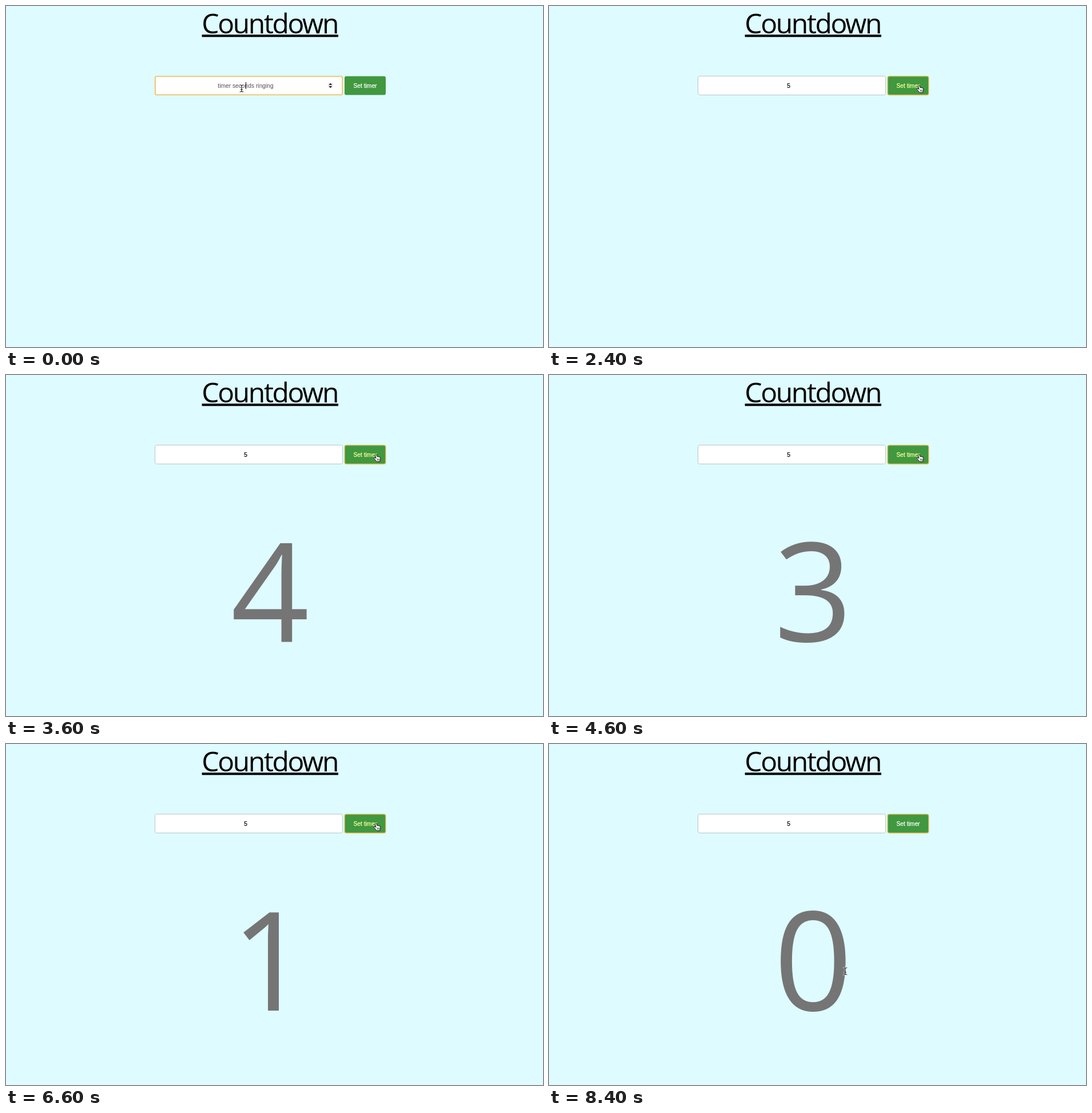
Recreate the animation shown at these times as an HTML page with a canvas. Size 939 px wide and 596 px high, loop 8.62 s.

```html
<!DOCTYPE html>
<html lang="en">
<head>
<meta charset="utf-8">
<title>Countdown</title>
<style>
  html, body { margin: 0; width: 100%; height: 100%; overflow: hidden; background: #defbff; }
  canvas { display: block; }
</style>
</head>
<body>
<canvas id="stage" width="939" height="596"></canvas>
<script>
const ctx = document.getElementById('stage').getContext('2d');
const LOOP = 8620;
const TYPED = 400, CLICKED = 1400, STARTED = 2600;
const SMALL = '10.25px "Liberation Sans", Arial, sans-serif';
const OPEN = '"Open Sans", "Noto Sans", sans-serif';
const ORANGE = '#f3bb4c';

// start time, pointer kind, x, y
const MOVES = [
  [0, 'beam', 412, 144],
  [600, 'beam', 468, 145],
  [800, 'beam', 574, 146],
  [1000, 'arrow', 682, 143],
  [1200, 'hand', 654, 145],
  [1400, 'hand', 649, 144.5],
  [7800, 'arrow', 636, 176],
  [8000, 'arrow', 585, 275],
  [8200, 'arrow', 533, 372],
  [8400, 'beam', 518, 397]
];

const HAND = new Path2D('M-3.5-5.5Q-2.5-7-1.3-5.5L0-1.8Q1-2.6 2-1.6Q3-2.2 4-1Q5.4-1.3 5.8.5' +
  'Q6.3 3 5 5L4.8 7H-.5Q-2 5-4 3.2Q-6.5.5-5 0Q-3.8-.4-2.2 1Z');
const FINGERS = new Path2D('M.5 2V5M2.3 2V5M4 2V5');
const ARROW = new Path2D('M0 0V13.5L3.2 10.6L5.3 15.4L7.6 14.4L5.6 9.8H10Z');
const BEAM = new Path2D('M-3-6Q-.4-6 0-4.8Q.4-6 3-6M0-5V5M-3 6Q-.4 6 0 4.8Q.4 6 3 6M-1.5 2H1.5');
const SPINNER = new Path2D('M564.3 138L567.3 134.8L570.3 138ZM564.3 140L567.3 143.2L570.3 140Z');

function box(x, y, w, h, r, fill, stroke, line) {
  ctx.beginPath();
  ctx.roundRect(x, y, w, h, r);
  if (fill) { ctx.fillStyle = fill; ctx.fill(); }
  if (stroke) outline(undefined, stroke, line);
}

function outline(path, color, width) {
  ctx.strokeStyle = color;
  ctx.lineWidth = width;
  path ? ctx.stroke(path) : ctx.stroke();
}

function label(text, x, y, font, color, align = 'center', spacing = 0) {
  ctx.font = font;
  ctx.fillStyle = color;
  ctx.textAlign = align;
  ctx.letterSpacing = spacing + 'px';
  ctx.fillText(text, x, y);
}

// small text with slightly firmer stems
function firmLabel(text, x, y, color) {
  label(text, x, y, SMALL, color);
  ctx.strokeStyle = color;
  ctx.lineWidth = .25;
  ctx.strokeText(text, x, y);
}

function drawField(t) {
  const focus = t < CLICKED;
  const typed = t >= TYPED;
  if (focus) box(260.9, 123, 327.3, 32.2, 2.5, '#fff', ORANGE, 1.6);
  else box(260.5, 122.5, 328, 33, 3, '#fff', '#b9c6cb', 1);
  if (typed) firmLabel('5', 419, 142.7, '#000');
  else label('timer seconds ringing', 419, 142.7, SMALL, '#505050');
  if (!focus) return;
  box(562.8, 134, 9, 10, 2, '#efefef');
  ctx.fillStyle = '#222';
  ctx.fill(SPINNER);
  if (t < 100 || (typed && t < 1000)) {
    ctx.fillStyle = '#000';
    ctx.fillRect(typed ? 422 : 419, 133, 1, 12);
  }
}

function drawButton(t, hover) {
  box(592, 122.8, 72, 32.7, 3, '#40983f');
  if (t >= CLICKED) box(592.2, 122.8, 71.6, 32.7, 3, null, '#e4b545', 1.3);
  firmLabel('Set timer', 628, 142.7, hover ? '#ffff9e' : '#fff');
}

function drawPointer([, kind, x, y]) {
  ctx.save();
  ctx.translate(x, y);
  ctx.lineJoin = ctx.lineCap = 'round';
  if (kind === 'beam') {
    outline(BEAM, 'rgba(255,255,255,.8)', 2.4);
    outline(BEAM, '#111', 1.1);
  } else {
    const hand = kind === 'hand';
    const path = hand ? HAND : ARROW;
    ctx.fillStyle = hand ? '#fff' : '#000';
    ctx.fill(path);
    outline(path, hand ? '#111' : '#fff', 1);
    if (hand) outline(FINGERS, '#111', .7);
  }
  ctx.restore();
}

function draw(t) {
  const pointer = MOVES.filter(m => m[0] <= t).pop();
  ctx.fillStyle = '#defbff';
  ctx.fillRect(0, 0, 939, 596);
  label('Countdown', 342.3, 48.3, '400 48px ' + OPEN, '#000', 'left', -2.4);
  ctx.fillRect(342.6, 50, 238.4, 4.2);
  drawField(t);
  drawButton(t, pointer[1] === 'hand');
  if (t >= STARTED) {
    const left = Math.max(0, 5 - Math.floor((t - STARTED) / 1000));
    label(left, 393.2, 465.6, '400 240px ' + OPEN, '#757575', 'left');
  }
  drawPointer(pointer);
}

const start = performance.now();
function tick() {
  draw((performance.now() - start) % LOOP);
  requestAnimationFrame(tick);
}
tick();
</script>
</body>
</html>
```
